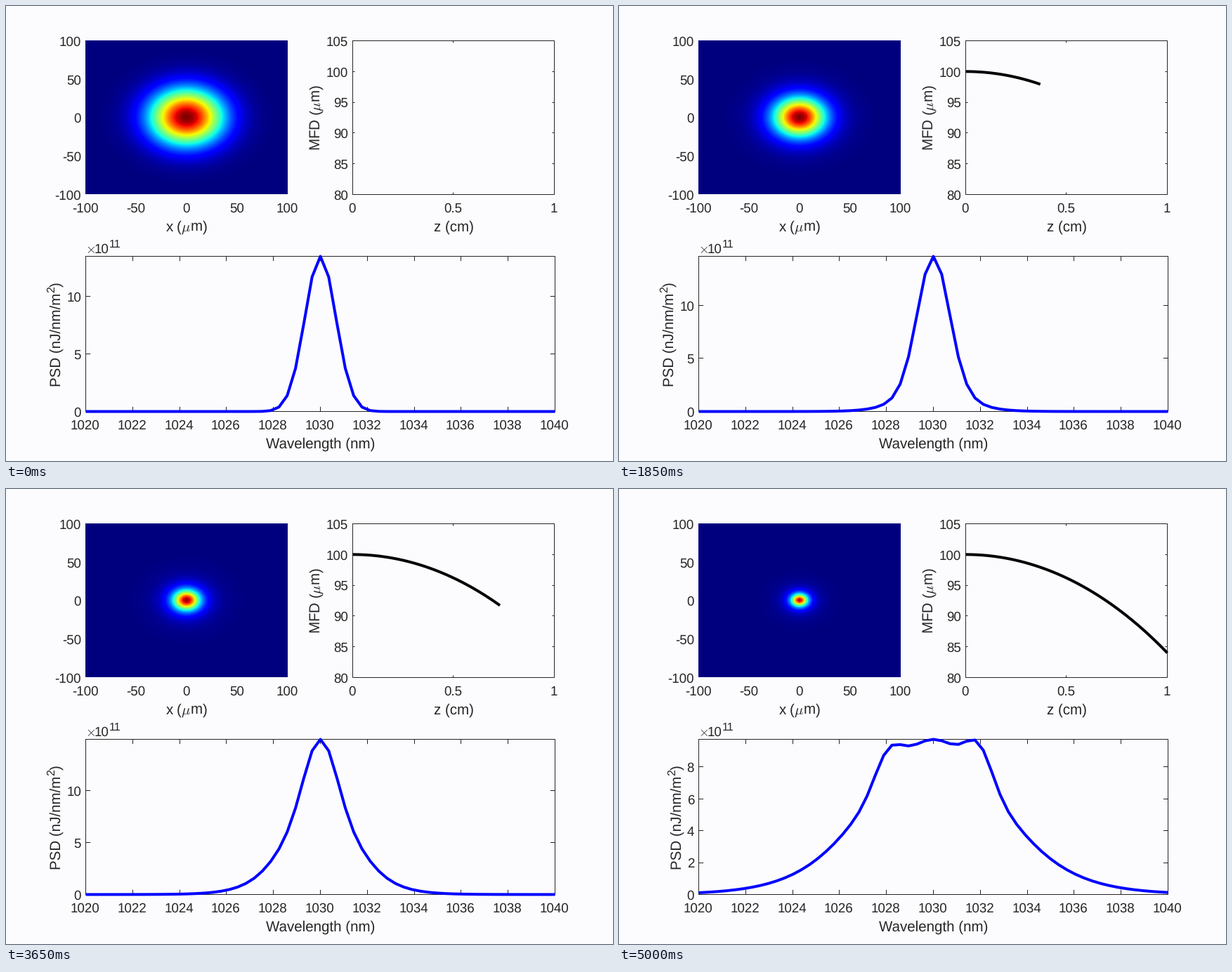
Recreate the animation shown at these times as a matplotlib script. Size 864x648 px, loop 5.05 s.

```python
import numpy as np
import matplotlib.pyplot as plt
from matplotlib.animation import FuncAnimation
from matplotlib.patches import Rectangle

plt.rcParams.update({
    "font.family": "Liberation Sans",
    "mathtext.fontset": "cm",
    "text.hinting": "none",
})

W, H = 864, 648
FRAMES = 101
PAPER, INK = "#fcfcfe", "#262626"
TICK, LABEL, SUPER = 18.8, 20.5, 16

# Panel boxes in pixels: left, top, right, bottom
BEAM = (113, 49, 401, 268)
MFD = (493, 49, 780, 268)
SPEC = (113, 356, 781, 577)

fig = plt.figure(figsize=(W / 72, H / 72), dpi=72, facecolor=PAPER)
ax = fig.add_axes([0, 0, 1, 1])
ax.axis("off")


# ---------- model ----------
order = np.arange(-29, 30)            # spectral samples, 0.1 THz apart
wavelength = 299792.458 / (299792.458 / 1030 - .1 * order)

grid = np.linspace(-100, 100, 65)     # micrometres
r2 = grid[:, None] ** 2 + grid[None, :] ** 2


def spectrum(z):
    """Input line fading into a pedestal that widens and grows shoulders."""
    line = 13.47 * (1 - .975 * z ** 2) * np.exp(-.1424 * order ** 2)

    width = 1.7 + 1.2 * z ** 2 + 1.7 * z ** 12
    height = z ** 2 * (23.3 - 13.9 * z ** 2)
    pedestal = height * 3 / (np.cosh(order / width) + 2)

    skew = 1 + .09 * np.sign(order)
    bump = np.exp(-((np.abs(order) - 5.5) / 2.2) ** 2)
    return line + pedestal + 1.9 * z ** 10 * skew * bump


def field_diameter(z):
    return 100 - 15 * z ** 2 - z ** 4


def beam(z):
    """Gaussian spot that shrinks and gains a power-law halo."""
    half_radius = 29.4 / (1 + 3 * z ** 2 + .5 * z ** 4)
    tail = .01 + .49 * z * z * (3 - 2 * z)
    return (1 + r2 / half_radius ** 2 * (2 ** tail - 1)) ** (-1 / tail)


# ---------- drawing helpers ----------
def scale(value, lo, hi, start, end):
    return start + (value - lo) / (hi - lo) * (end - start)


def text(x, y, s, size=TICK, ha="center", **kw):
    return ax.text(x, y, s, size=size, color=INK, ha=ha, va="baseline", **kw)


def upright(x, y, s, size=LABEL, ha="left"):
    return text(x, y, s, size, ha, rotation=90, rotation_mode="anchor")


def thin(x, y):
    return ax.plot(x, y, color=INK, lw=1, solid_capstyle="butt",
                   solid_joinstyle="miter", snap=False, zorder=2)[0]


def thick(color):
    return ax.plot([], [], color=color, lw=4, zorder=4,
                   solid_joinstyle="round", solid_capstyle="butt")[0]


def frame_box(box):
    l, t, r, b = box
    thin([l, r, r, l, l], [t, t, b, b, t])


def x_ticks(box, values, lo, hi, baseline, length=0):
    l, t, r, b = box
    for v in values:
        x = scale(v, lo, hi, l, r)
        text(x - 1, baseline, f"{v:g}")
        if length and lo < v < hi:
            x = round(x)
            thin([x, x], [b, b - length])
            thin([x, x], [t, t + length])


def y_ticks(box, values, lo, hi, length=0):
    l, t, r, b = box
    for v in values:
        y = scale(v, lo, hi, b, t)
        text(l - 6.5, y + 7.2, f"{v:g}", ha="right")
        if length and lo < v < hi:
            y = round(y)
            thin([l, l + length], [y, y])
            thin([r, r - length], [y, y])


# ---------- beam panel ----------
cx, cy = (BEAM[0] + BEAM[2] - 1) / 2, (BEAM[1] + BEAM[3]) / 2
half_w = (BEAM[2] - BEAM[0]) / 2 * 65 / 64
half_h = (BEAM[3] - BEAM[1]) / 2 * 65 / 64
image = ax.imshow(beam(0), cmap="jet", vmin=0, vmax=1, aspect="auto",
                  interpolation="bilinear", origin="lower", zorder=1,
                  extent=(cx - half_w, cx + half_w,
                          cy + half_h, cy - half_h))
window = Rectangle((BEAM[0] - .5, BEAM[1] - .5), BEAM[2] - BEAM[0],
                   BEAM[3] - BEAM[1] + .5, transform=ax.transData)
image.set_clip_path(window)
ax.set_xlim(-.5, W - .5)
ax.set_ylim(H - .5, -.5)

x_ticks(BEAM, range(-100, 101, 50), -100, 100, 293)
y_ticks(BEAM, range(-100, 101, 50), -100, 100)
text(256.5, 320.5, r"x ($\mu$m)", LABEL)

# ---------- mode field panel ----------
frame_box(MFD)
x_ticks(MFD, [0, .5, 1], 0, 1, 293, 3)
y_ticks(MFD, range(80, 106, 5), 80, 105, 3)
text(636.5, 320.5, "z (cm)", LABEL)
upright(447, 158.5, r"MFD ($\mu$m)", ha="center")

# ---------- spectrum panel ----------
frame_box(SPEC)
x_ticks(SPEC, range(1020, 1041, 2), 1020, 1040, 602, 6.7)
text(447.5, 629, "Wavelength (nm)", LABEL)
ax.text(119.3, 345.5, r"$\times$", size=TICK, color=INK,
        ha="center", va="center")
text(125, 351.5, "10", ha="left")
text(146.5, 343, "11", SUPER, ha="left")

psd = [(77.5, upright(77.5, 541, "PSD (nJ/nm/m")),
       (69, upright(69, 407.6, "2", SUPER)),
       (77.5, upright(77.5, 399, ")"))]
power_labels = [text(SPEC[0] - 6.5, 0, "", ha="right") for _ in range(5)]
power_ticks = [(thin([], []), thin([], [])) for _ in range(5)]

curve, trace = thick("#0000ff"), thick("black")

inside = (wavelength > 1020) & (wavelength < 1040)
nm = np.concatenate([[1020], wavelength[inside], [1040]])


def update_power_axis(top):
    l, t, r, b = SPEC
    step = 5 if top >= 10 else 2
    for i, (label, pair) in enumerate(zip(power_labels, power_ticks)):
        v = i * step
        shown = v <= top
        y = scale(v, 0, top, b, t)
        label.set_visible(shown)
        label.set_text(str(v))
        label.set_y(y + 7.2)
        pair[0].set_data([l, l + 6.7], [round(y)] * 2)
        pair[1].set_data([r, r - 6.7], [round(y)] * 2)
        for mark in pair:
            mark.set_visible(shown and i > 0)
    shift = 0 if step == 5 else 10.4
    for x, part in psd:
        part.set_x(x + shift)


def draw(i):
    z = i / (FRAMES - 1)
    image.set_data(beam(z))

    path = np.linspace(0, z, i + 1)
    trace.set_data(scale(path, 0, 1, MFD[0], MFD[2]),
                   scale(field_diameter(path), 80, 105, MFD[3], MFD[1]))

    power = spectrum(z)
    top = power.max()
    curve.set_data(scale(nm, 1020, 1040, SPEC[0], SPEC[2]),
                   scale(np.interp(nm, wavelength, power), 0, top,
                         SPEC[3], SPEC[1]))
    update_power_axis(top)
    return image, trace, curve


anim = FuncAnimation(fig, draw, frames=FRAMES, interval=50, repeat=True,
                     repeat_delay=0, init_func=lambda: draw(0), blit=False)
plt.show()
```
